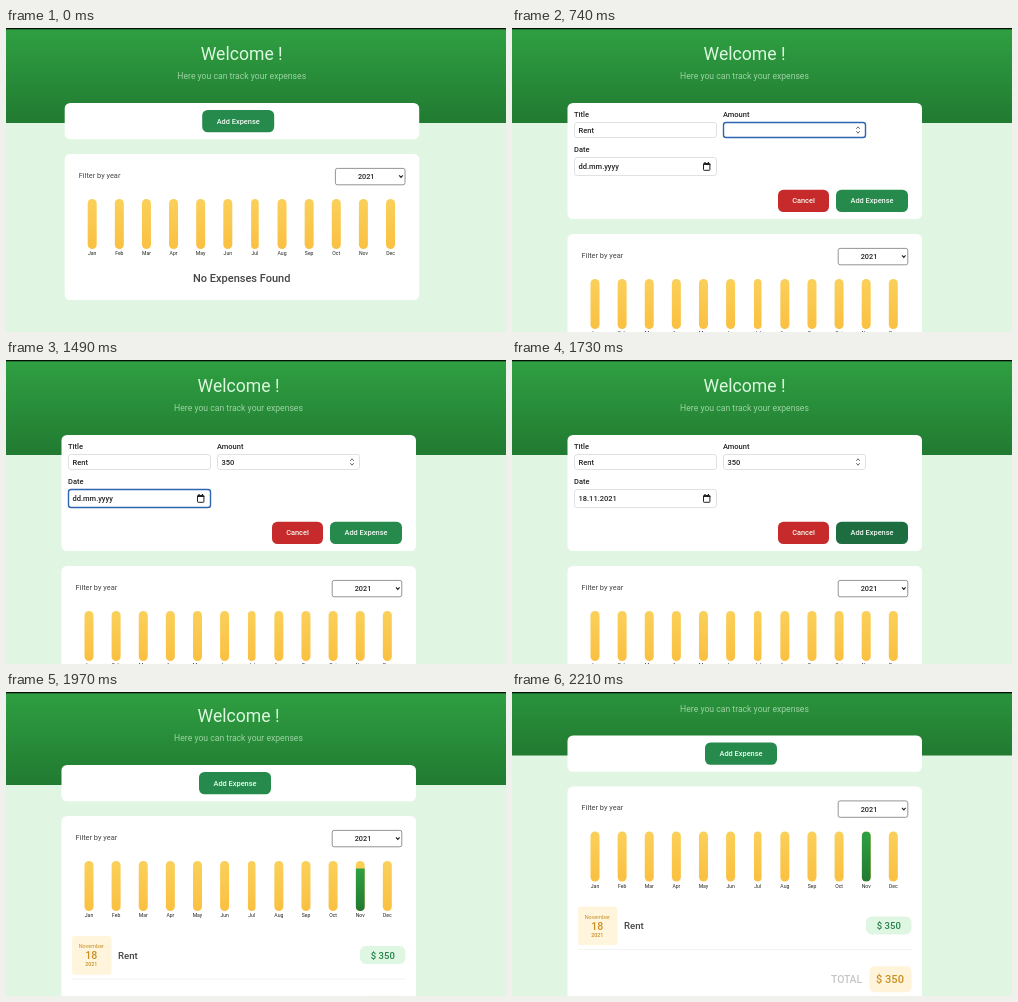
Animation, 500 px wide and 304 px high, one loop 2.33 s. Source, as an HTML page:

```html
<!DOCTYPE html>
<html lang="en">
<head>
<meta charset="utf-8">
<title>Expense tracker</title>
<style>
  html, body { margin: 0; width: 100%; height: 100%; overflow: hidden; }
  svg { display: block; width: 500px; height: 304px; font-family: Roboto, Inter, sans-serif; }
</style>
</head>
<body>
<svg viewBox="0 0 500 304">
  <defs>
    <linearGradient id="green" x2="0" y2="1">
      <stop stop-color="#2fa042"/><stop offset="1" stop-color="#217a31"/>
    </linearGradient>
    <linearGradient id="amber" x2="0" y2="1">
      <stop stop-color="#fad05a"/><stop offset="1" stop-color="#fac041"/>
    </linearGradient>
    <clipPath id="bar"><rect x="349.8" y="171" width="9" height="50" rx="4.3"/></clipPath>
  </defs>
  <g id="page"></g>
  <rect width="500" height="1.3" fill="#031006"/>
</svg>
<script>
const LOOP = 2330;
const MONTHS = 'Jan Feb Mar Apr May Jun Jul Aug Sep Oct Nov Dec'.split(' ');
const INK = '#222', GREEN = '#268a4d', GOLD = '#c98f22';

// Each step adds to the state before it.
const STEPS = [
  [0, { form: false, title: '', amount: '', date: '', focus: '', hover: false, fill: 0, scroll: 0, thumb: 0 }],
  [250, { form: true, thumb: .22 }],
  [500, { focus: 'title', thumb: .1 }],
  [620, { title: 'Rent', thumb: 0 }],
  [740, { focus: 'amount' }],
  [1240, { amount: '350' }],
  [1490, { focus: 'date' }],
  [1610, { date: '18.11.2021' }],
  [1730, { focus: '', hover: true }],
  [1850, { form: false, hover: false, fill: .22 }],
  [1970, { fill: .85, scroll: 2 }],
  [2090, { fill: 1, scroll: 13 }],
  [2210, { scroll: 31.5 }],
];

const rect = (x, y, w, h, r, fill, extra = '') =>
  `<rect x="${x}" y="${y}" width="${w}" height="${h}" rx="${r}" fill="${fill}" ${extra}/>`;
const text = (s, x, y, size, fill, weight = 400, anchor = 'start') =>
  `<text x="${x}" y="${y}" font-size="${size}" fill="${fill}" font-weight="${weight}" text-anchor="${anchor}">${s}</text>`;
const middle = (s, x, y, size, fill, weight) => text(s, x, y, size, fill, weight, 'middle');
const line = (d, color, width = 1) =>
  `<path d="${d}" fill="none" stroke="${color}" stroke-width="${width}"/>`;
const button = (s, x, y, w, fill) =>
  rect(x, y, w, 22.3, 5.5, fill) + middle(s, x + w / 2, y + 13.7, 7.4, '#eefaf0', 500);

function field(label, value, x, y, h, focused) {
  const border = focused ? '#2f66b0' : '#dedede';
  return text(label, x, y - 5.2, 7.5, INK, 500) +
    rect(x + .5, y + .5, 142, h - 1, 2.5, '#fff', `stroke="${border}" stroke-width="${focused ? 1.4 : .9}"`) +
    text(value, x + 4.5, y + h / 2 + 2.7, 7.5, INK, 500);
}

function form(s) {
  return field('Title', s.title, 62, 94, 16, s.focus == 'title') +
    field('Amount', s.amount, 211, 94, 16, s.focus == 'amount') +
    line('M344.3 100.8l1.7-2 1.7 2M344.3 103.2l1.7 2 1.7-2', '#555', .9) +
    field('Date', s.date || 'dd.mm.yyyy', 62, 129, 19, s.focus == 'date') +
    rect(191.5, 135.5, 6.4, 6.8, .6, 'none', 'stroke="#222"') +
    line('M191 136.3h7.4M193 134v2M196.4 134v2', '#222', 1.3) +
    button('Cancel', 266, 161.7, 51, '#c62a2a') +
    button('Add Expense', 324, 161.7, 72, s.hover ? '#1e6d40' : GREEN);
}

function chart(s) {
  return MONTHS.map((name, i) => {
    const x = 83 + i * 27.12, w = i == 6 ? 7.6 : 9;
    return rect(x - w / 2, 171, w, 50, w / 2, 'url(#amber)') +
      middle(name, x, 227, 5.1, INK);
  }).join('') +
    rect(349.8, 221 - 50 * s.fill, 9, 50 * s.fill, 0, 'url(#green)', 'clip-path="url(#bar)"');
}

function list() {
  return rect(66, 246, 39.5, 38.7, 3, '#fff5dc') +
    middle('November', 85.3, 258, 5.5, GOLD) +
    middle('18', 85.3, 269, 10.6, GOLD, 500) +
    middle('2021', 85.3, 276.3, 5.3, GOLD, 500) +
    text('Rent', 112, 268.5, 9.6, '#444', 500) +
    rect(354, 256, 45.5, 18, 6, '#dff6e2') +
    middle('$ 350', 376.8, 268.5, 9.5, '#23814a', 500) +
    line('M66 289h334', '#f0f0f0', .8) +
    text('TOTAL', 319, 322.5, 10.4, '#c6c6c6', 500) +
    rect(357.5, 305.7, 42, 26, 5, '#fff4da') +
    middle('$ 350', 378, 322.7, 11.1, GOLD, 500);
}

function page(s) {
  const empty = !s.fill;
  const shift = empty && !s.form ? 3.2 : 0;   // scrollbar gutter is absent on the short page
  return `<rect width="500" height="304" fill="#e1f6e2"/>
    <g transform="translate(0 ${-s.scroll})">
      <rect width="500" height="95" fill="url(#green)"/>
      <g transform="translate(${shift} 0)">` +
    middle('Welcome !', 232.5, 31.7, 17.6, '#dcf8df', 400) +
    middle('Here you can track your expenses', 232.5, 51, 8.65, '#9bd3a3') +
    rect(55.5, 75, 354.5, s.form ? 116 : 36.3, 5.5, '#fff') +
    (s.form ? form(s) : button('Add Expense', 193, 82, 72, GREEN)) +
    `<g transform="translate(0 ${s.form ? 80 : 0})">` +
    rect(55.5, 126, 354.5, empty ? 146 : 230, 5.5, '#fff') +
    text('Filter by year', 69.5, 149.5, 7.4, '#444') +
    rect(326.2, 140.4, 69.6, 16.4, 2, '#fff', 'stroke="#888" stroke-width=".9"') +
    middle('2021', 357, 151.2, 7.3, INK, 500) +
    line('M390 147.4l1.8 2 1.8-2', '#222', 1.1) +
    chart(s) +
    (empty ? middle('No Expenses Found', 232.5, 254, 11, '#444', 500) : list()) +
    `</g></g></g>` +
    rect(497, 0, 3, 304, 0, '#000', `opacity="${s.thumb}"`);
}

const root = document.getElementById('page');
let shown = -1;
function draw(now) {
  const t = now % LOOP;
  const n = STEPS.filter(([at]) => at <= t).length;
  if (n != shown) {
    shown = n;
    root.innerHTML = page(Object.assign({}, ...STEPS.slice(0, n).map(step => step[1])));
  }
}

const start = performance.now();
function tick() {
  draw(performance.now() - start);
  requestAnimationFrame(tick);
}
tick();
</script>
</body>
</html>
```
